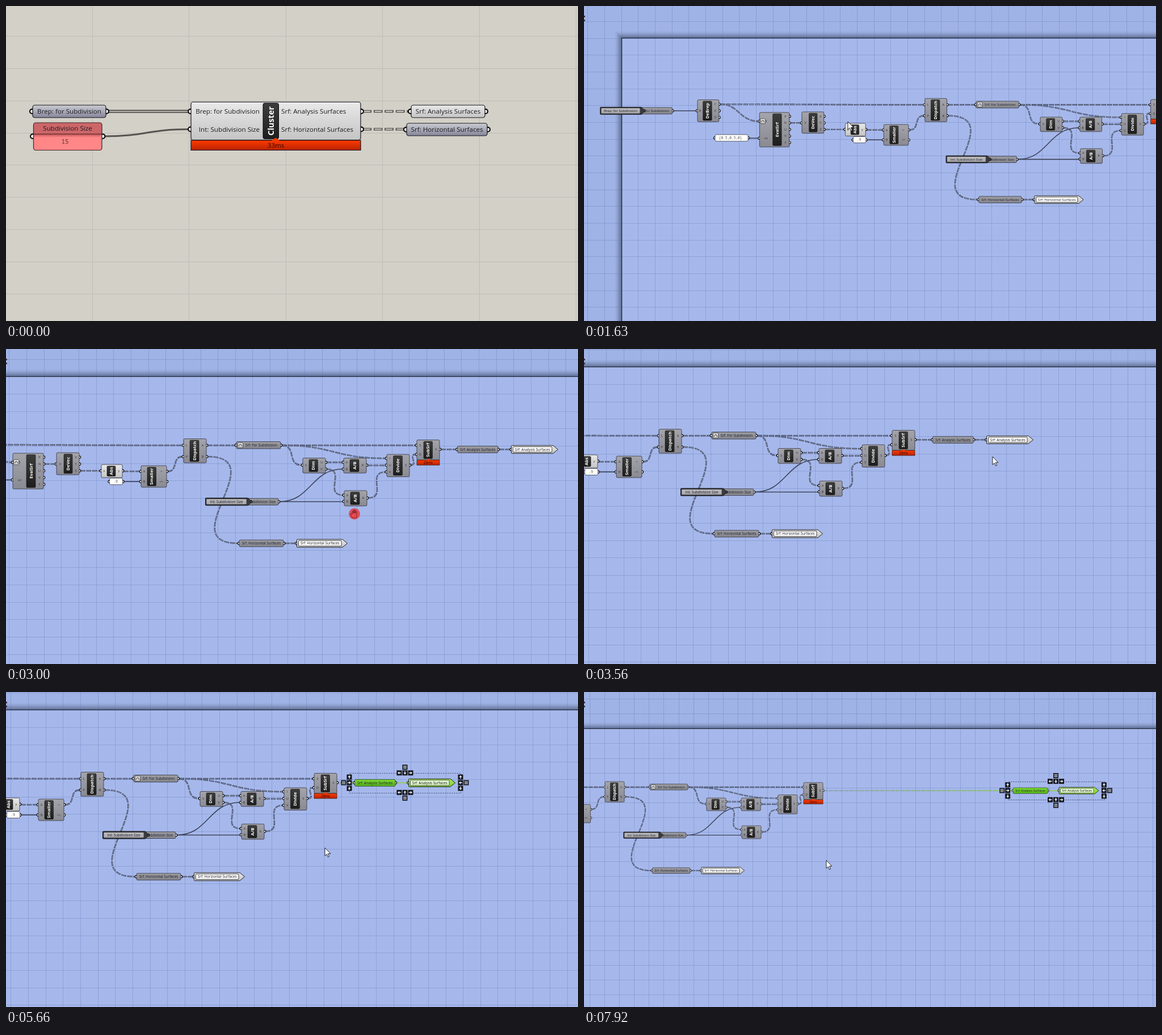
An HTML page with a canvas that plays this animation: 1008 by 556 pixels, repeating every 8000 ms.

```html
<!DOCTYPE html>
<html lang="en">
<head>
<meta charset="utf-8">
<title>Cluster editing</title>
<style>
html, body { margin: 0; width: 100%; height: 100%; overflow: hidden; background: #d3d0c8; }
canvas { display: block; width: 1008px; height: 556px; }
</style>
</head>
<body>
<canvas id="stage" width="1008" height="556"></canvas>
<script>
const W = 1008, H = 556, LOOP = 8000;
const g = document.getElementById('stage').getContext('2d');
const SANS = '"Open Sans", "Noto Sans", sans-serif';
const MONO = '"Noto Sans Mono", "DejaVu Sans Mono", monospace';
let u = 1; // drawing unit: size of strokes, type and grips

const TONE = {
  grey: ['#a4a4ab', '#8a8a93'],
  param: ['#9c9ca3', '#85858e'],
  steel: ['#cbcbd2', '#85859a'],
  light: ['#e9e9e9', '#c4c4c4'],
  white: ['#ffffff', '#ffffff'],
  dark: ['#3d3d3d', '#1d1d1d'],
  heat: ['#ff3a00', '#b82300'],
  green: ['#7bd834', '#55b41c'],
  lime: ['#a6ea5e', '#7fd02f']
};

// time, scale, offset x, offset y
const CAMERA = [
  [1430, .92, 563, -10], [1630, .968, 473, 26.2], [1700, .968, 473, 26.2],
  [1970, 1, 413, 50], [2500, 1, 413, 50], [2990, 1, 181, 17], [3065, 1, 181, 17],
  [3300, 1, 0, 0], [5790, 1, 0, 0], [6100, .8516, 85.6, 39],
  [7580, .8516, 85.6, 39], [7780, .8516, -75.4, 37.6]
];
// time, x, y
const POINTER = [
  [130, 954, 536], [880, 465, 204], [2170, 465, 204], [2500, 846, 324],
  [2990, 614, 291], [3065, 614, 291], [3300, 433, 274], [3560, 720, 190],
  [3640, 720, 190], [3780, 776, 195], [3850, 776, 195], [4620, 645, 116],
  [4690, 645, 116], [5380, 548, 262], [5460, 562, 275], [5790, 562, 275],
  [6100, 570, 276], [6490, 577, 263], [6630, 640, 177], [6700, 640, 177],
  [7080, 948, 177], [7240, 781, 264], [7380, 700, 303], [7580, 700, 303],
  [7780, 539, 299], [7920, 427, 297]
];
const DRAG = [[6700, 0], [7080, 362]];

function track(keys, t) {
  const n = keys.findIndex(k => k[0] > t);
  if (n === 0) return keys[0].slice(1);
  if (n < 0) return keys[keys.length - 1].slice(1);
  const a = keys[n - 1], b = keys[n];
  let p = (t - a[0]) / (b[0] - a[0]);
  p = p * p * (3 - 2 * p);
  return a.slice(1).map((v, i) => v + (b[i + 1] - v) * p);
}
const within = (t, a, b) => t >= a && t < b;

function shade(y0, y1, tone) {
  const f = g.createLinearGradient(0, y0, 0, y1);
  f.addColorStop(0, TONE[tone][0]);
  f.addColorStop(1, TONE[tone][1]);
  return f;
}

function box(x0, y0, x1, y1, tone, r = 2 * u, line = .65 * u, ink = '#17171c') {
  g.beginPath();
  g.roundRect(x0, y0, x1 - x0, y1 - y0, r);
  g.fillStyle = shade(y0, y1, tone);
  g.fill();
  if (line) {
    g.lineWidth = line;
    g.strokeStyle = ink;
    g.stroke();
  }
}

function text(s, x, y, align = 'center', size = 6.3 * u, color = '#1c1c22', font = SANS, weight = '') {
  g.font = `${weight} ${size}px ${font}`;
  g.textAlign = align;
  g.textBaseline = 'alphabetic';
  g.fillStyle = color;
  g.fillText(s, x, y + size * .35);
}

function grip(x, y) {
  g.beginPath();
  g.arc(x, y, 2.1 * u, 0, 7);
  g.fillStyle = '#fff';
  g.fill();
  g.lineWidth = 1.15 * u;
  g.strokeStyle = '#0c0c0e';
  g.stroke();
}

function plate(x0, y0, x1, y1, label) {
  box(x0, y0, x1, y1, 'dark', 1.6 * u, .5 * u, '#000');
  g.save();
  g.translate((x0 + x1) / 2, (y0 + y1) / 2);
  g.rotate(-Math.PI / 2);
  text(label, 0, 0, 'center', 7.8 * u, '#fff', SANS, 'bold');
  g.restore();
}

function timer(x0, y0, x1, y1, label) {
  box(x0, y0, x1, y1, 'heat', 0);
  const x = (x0 + x1) / 2;
  g.beginPath();
  g.moveTo(x - 3.8 * u, y0 + .4 * u);
  g.lineTo(x, y0 - 2.4 * u);
  g.lineTo(x + 3.8 * u, y0 + .4 * u);
  g.fillStyle = '#ff3a00';
  g.fill();
  text(label, x, (y0 + y1) / 2, 'center', 6.2 * u, '#2a0800');
}

// ports are written as name followed by height, such as "A183"
const ports = list => list.split(' ').map(p => p.match(/^(\D+)(\d+)$/)).map(m => [m[1], +m[2]]);

function node(x0, y0, x1, y1, label, px, pw, ins, outs, tone = 'grey') {
  const a = ports(ins), b = ports(outs);
  a.forEach(p => grip(x0 - .6, p[1]));
  b.forEach(p => grip(x1 + .6, p[1]));
  box(x0, y0, x1, y1, tone);
  a.forEach(p => text(p[0], (x0 + px) / 2, p[1], 'center', 5.6, '#30303a'));
  b.forEach(p => text(p[0], (x1 + px + pw) / 2, p[1], 'center', 5.6, '#30303a'));
  plate(px, y0 + 2.5, px + pw, y1 - 2.5, label);
}

function param(x0, y0, x1, y1, label, tone, shift = 0) {
  const y = (y0 + y1) / 2;
  grip(x0 - u * .6, y);
  grip(x1 + u * .6, y);
  box(x0, y0, x1, y1, tone);
  text(label, (x0 + x1) / 2 + shift, y);
}

function arrowBox(x0, y0, x1, y1, tip, fill, line) {
  g.beginPath();
  g.moveTo(x0 + 1, y0);
  g.lineTo(x1, y0);
  g.lineTo(tip, (y0 + y1) / 2);
  g.lineTo(x1, y1);
  g.lineTo(x0 + 1, y1);
  g.quadraticCurveTo(x0, y1, x0, y1 - 1);
  g.lineTo(x0, y0 + 1);
  g.quadraticCurveTo(x0, y0, x0 + 1, y0);
  g.fillStyle = fill;
  g.fill();
  g.lineWidth = line;
  g.strokeStyle = '#111';
  g.stroke();
}

function inlet(x, y, label) {
  grip(x + 80, y);
  arrowBox(x, y - 6.5, x + 75, y + 6.5, x + 81, '#3a3a40', 1);
  box(x + 2, y - 4.6, x + 72, y + 4.6, 'light', 1, 0);
  g.fillStyle = 'rgba(120,120,130,.4)';
  g.fillRect(x + 2, y - 4.6, 70, 9.2);
  text(label, x + 37, y);
}

function outlet(x0, x1, y, label, lit) {
  grip(x0 - .6, y);
  arrowBox(x0, y - 7, x1, y + 7, x1 + 8.5, shade(y - 7, y + 7, lit ? 'lime' : 'light'), .9);
  box(x0 + 3, y - 4.8, x1 - 2, y + 4.8, 'white', .8, .8);
  if (lit) {
    g.fillStyle = 'rgba(170,225,110,.35)';
    g.fillRect(x0 + 3, y - 4.8, x1 - x0 - 5, 9.6);
  }
  text(label, (x0 + x1) / 2 + .5, y);
}

function wire(x0, y0, x1, y1, kind, ink, core) {
  const c = Math.max(Math.abs(x1 - x0) / 2, Math.abs(y1 - y0) * .76);
  const draw = (width, color, dash, shift = 0, dy = 0) => {
    g.setLineDash(dash);
    g.lineDashOffset = shift;
    g.lineWidth = width;
    g.strokeStyle = color;
    g.beginPath();
    g.moveTo(x0, y0 + dy);
    g.bezierCurveTo(x0 + c, y0 + dy, x1 - c, y1 + dy, x1, y1 + dy);
    g.stroke();
  };
  if (kind === 'tree') {
    draw(2.5 * u, ink, [8.6 * u, 2 * u]);
    draw(1.05 * u, core, [6.6 * u, 4 * u], -u);
  } else if (kind === 'list') {
    draw(1.1 * u, ink, [], 0, -u);
    draw(1.1 * u, ink, [], 0, u);
  } else draw(1.65 * u, ink, []);
  g.setLineDash([]);
}

function blend(x0, x1, a, b) {
  const f = g.createLinearGradient(x0, 0, x1, 0);
  f.addColorStop(0, a);
  f.addColorStop(1, b);
  return f;
}

function grid(x, y, dx, dy, color) {
  g.fillStyle = color;
  for (let p = ((x % dx) + dx) % dx; p < W; p += dx) g.fillRect(Math.round(p), 0, 1, H);
  for (let p = ((y % dy) + dy) % dy; p < H; p += dy) g.fillRect(0, Math.round(p), W, 1);
}

function outer(picked) {
  u = 1.85;
  g.fillStyle = '#d3d0c8';
  g.fillRect(0, 0, W, H);
  grid(152, 53, 170.4, 56.85, '#bfbdb5');

  const ink = '#55534f', core = '#cfccc4', hot = '#62b820', pale = '#b9dc8e';
  const into = picked ? blend(178, 324, ink, hot) : ink;
  const out = picked ? blend(628, 710, hot, ink) : ink;
  wire(178, 186, 324, 186, 'list', into);
  wire(172, 230, 324, 217.5, 'item', into);
  wire(628, 186, 712, 186, 'tree', out, picked ? pale : core);
  wire(628, 217.5, 705, 217.5, 'tree', out, picked ? pale : core);

  param(47, 175, 176, 197, 'Brep: for Subdivision', 'steel');
  grip(47, 230);
  grip(170.5, 230);
  g.beginPath();
  g.roundRect(48.5, 206, 120.5, 48.5, 4);
  g.fillStyle = '#ff8788';
  g.fill();
  g.save();
  g.clip();
  g.fillStyle = '#cc6668';
  g.fillRect(48, 206, 122, 20);
  const fall = g.createLinearGradient(0, 226, 0, 232);
  fall.addColorStop(0, 'rgba(120,30,30,.5)');
  fall.addColorStop(1, 'rgba(120,30,30,0)');
  g.fillStyle = fall;
  g.fillRect(48, 226, 122, 6);
  g.fillStyle = '#4a2224';
  g.fillRect(48, 225.5, 122, 1);
  g.restore();
  g.lineWidth = 1.2;
  g.strokeStyle = '#3b2527';
  g.stroke();
  text('Subdivision Size', 108.5, 216);
  text('15', 104, 239, 'center', 11, '#5a3638', MONO);

  [186, 217.5].forEach(y => { grip(325, y); grip(626, y); });
  timer(326, 237, 625, 254.5, '33ms');
  box(326, 169.5, 625, 236.5, picked ? 'lime' : 'light');
  text('Brep: for Subdivision', 447, 186, 'right');
  text('Int: Subdivision Size', 447, 217.5, 'right');
  text('Srf: Analysis Surfaces', 485, 186, 'left');
  text('Srf: Horizontal Surfaces', 485, 217.5, 'left');
  plate(453, 171.5, 480.5, 234.5, 'Cluster');
  g.beginPath();
  g.moveTo(468, 237);
  g.lineTo(475, 232.5);
  g.lineTo(482, 237);
  g.fillStyle = '#ff3a00';
  g.fill();

  param(714, 175, 844, 197, 'Srf: Analysis Surfaces', 'light');
  param(706, 207, 848, 229, 'Srf: Horizontal Surfaces', 'steel');
}

const hatch = (() => {
  const c = document.createElement('canvas');
  c.width = c.height = 4;
  const k = c.getContext('2d');
  k.fillStyle = '#a2b5e8';
  k.fillRect(0, 0, 4, 4);
  k.fillStyle = '#99ace0';
  for (let i = 0; i < 4; i++) k.fillRect(i, i, 1, 1);
  return g.createPattern(c, 'repeat');
})();

function backdrop(s, ox, oy) {
  g.fillStyle = hatch;
  g.fillRect(0, 0, W, H);
  const x = Math.round(ox - 420.5 * s), y = Math.round(oy + 31 * s);
  for (let i = 13; i > 0; i--) {
    g.fillStyle = `rgba(30,38,62,${.085 * (1 - i / 14)})`;
    g.fillRect(x - i * s, y - i * s, 3000, 3000);
  }
  g.fillStyle = '#a6b8eb';
  g.fillRect(x, y, 3000, 3000);
  grid(ox + 8.3 * s, oy + 62 * s, 30.65 * s, 30.65 * s, 'rgba(85,108,175,.29)');
  g.fillStyle = '#1d2436';
  g.fillRect(x, y, 3000, 1.2);
  g.fillRect(x, y, 1.2, 3000);
}

function badge(x, y) {
  box(x, y, x + 9, y + 9, 'light', 1, .6);
  g.beginPath();
  g.moveTo(x + 2, y + 6.5);
  g.lineTo(x + 3.2, y + 3);
  g.lineTo(x + 5.8, y + 3);
  g.lineTo(x + 7, y + 6.5);
  g.lineWidth = .8;
  g.strokeStyle = '#222';
  g.stroke();
}

function inner(picked, dx) {
  u = 1;
  const ink = '#3c435a', core = '#8c97b6';
  const tree = (...p) => wire(...p, 'tree', ink, core);
  const item = (...p) => wire(...p, 'item', ink);

  item(-326, 164, -284, 164);
  tree(-241, 152, 130, 153);
  tree(-241, 152, -171, 183);
  item(-188, 214, -171, 214);
  tree(-113, 186, -94, 186);
  tree(-50, 198, -15, 198);
  tree(26, 199, 55, 199);
  item(27, 217, 55, 217);
  tree(104, 199, 130, 173);
  tree(174, 153, 223, 153);
  tree(174, 173, 228, 326);
  tree(305, 153, 541, 153);
  tree(305, 153, 340, 188);
  tree(305, 153, 488, 176);
  tree(384, 183, 412, 183);
  tree(384, 195, 413, 241);
  item(301, 252.5, 412, 195);
  item(301, 252.5, 413, 252.5);
  tree(456, 188.5, 488, 188.5);
  tree(457, 246, 488, 200);
  tree(532, 188, 541, 169);
  tree(310, 326, 329, 326);
  if (picked) {
    g.globalAlpha = .8;
    wire(585, 160.3, 612 + dx, 160.3, 'tree', blend(585, 613 + dx, '#7d8cae', '#78c42a'), '#a8c9a4');
    wire(688 + dx, 160.3, 707 + dx, 160.3, 'tree', '#7cc43c', '#b5e08c');
    g.globalAlpha = 1;
  } else {
    tree(585, 160.3, 612, 160.3);
    tree(688, 160.3, 707, 160.3);
  }

  param(-400, 158, -328, 170, 'Brep: for Subdivision', 'param');
  inlet(-459, 164, 'Brep: for Subdivision');
  node(-282, 144, -243, 184, 'DeBrep', -272, 16, 'B164', 'F152 E164 V176');
  grip(-250.5, 213.5);
  grip(-189.5, 213.5);
  box(-250, 207.5, -190, 219.5, 'white', 2);
  text('{0.5,0.5,0}', -222, 213.5, 'center', 6.4, '#555', MONO);
  node(-169, 167, -115, 230, 'EvalSrf', -145, 16, 'S183 uv214', 'P174 N186 U198 V210 F222');
  badge(-167.5, 178.5);
  node(-92, 166, -52, 205, 'DeVec', -79, 15, 'V186', 'X174 Y186 Z198');
  node(-13, 187, 24, 210, 'Abs', -3, 15, 'x198', 'y198', 'light');
  grip(1, 217);
  grip(25, 217);
  box(1.5, 211, 24.5, 222.5, 'white', 2);
  text('.9', 12, 216.5, 'center', 6.4, '#555', MONO);
  node(57, 189, 102, 227, 'Smaller', 68, 15.5, 'A199 B217', '<199 <=217');
  node(132, 141.5, 172, 184, 'Dispatch', 143, 16, 'L153 P173', 'A153 B173');
  param(225, 146.5, 303, 159, 'Srf: For Subdivision', 'param', 5);
  badge(227.5, 148.3);
  node(342, 175.5, 382, 202, 'Dim', 353, 15.5, 'S188', 'U183 V195');
  node(414, 175.5, 454, 202, 'A/B', 425, 16, 'A183 B195', 'R188');
  node(415, 233, 455, 260, 'A/B', 426, 16, 'A241 B252', 'R246');
  node(490, 169, 530, 208.5, 'Divide', 501.5, 16, 'I176 U188 V200', 'S188');
  node(543, 143.5, 583, 179, 'SubSrf', 555, 15.5, 'S153 D169', 'S160');
  timer(543, 179, 583, 188, '28ms');
  param(231, 246.8, 299, 258.5, 'Int: Subdivision Size', 'param');
  inlet(170.5, 252.5, 'Int: Subdivision Size');
  param(230, 320, 308, 332, 'Srf: Horizontal Surfaces', 'param');
  outlet(331.5, 412, 326, 'Srf: Horizontal Surfaces');
  param(614.5 + dx, 154.3, 686 + dx, 166.3, 'Srf: Analysis Surfaces', picked ? 'green' : 'param');
  outlet(709.5 + dx, 783 + dx, 160.3, 'Srf: Analysis Surfaces', picked);
}

// turn counts quarter turns of the arrow; null gives the bars glyph
function button(x, y, turn) {
  g.save();
  g.translate(x, y);
  g.fillStyle = '#14171e';
  g.fillRect(-4.5, -4.5, 9, 9);
  g.fillStyle = '#e8ecf6';
  if (turn === null) {
    for (let i = -2; i <= 2; i += 2) g.fillRect(-3, i - .5, 6, 1);
  } else {
    g.rotate(turn * Math.PI / 2);
    g.beginPath();
    g.moveTo(0, -3);
    g.lineTo(2.6, .2);
    g.lineTo(-2.6, .2);
    g.fill();
    g.fillRect(-.7, 0, 1.4, 3);
  }
  g.restore();
}

function aligner(s, ox, oy, dx) {
  const x0 = ox + s * (614.5 + dx) - 9.5, x1 = ox + s * (791.5 + dx) + 9.5;
  const y0 = oy + s * 153.3 - 10.5, y1 = oy + s * 167.3 + 10;
  const x = (x0 + x1) / 2, y = (y0 + y1) / 2;
  g.setLineDash([2, 2]);
  g.lineWidth = 1;
  g.strokeStyle = '#3a4770';
  g.strokeRect(Math.round(x0) + .5, Math.round(y0) + .5, Math.round(x1 - x0), Math.round(y1 - y0));
  g.setLineDash([]);
  [[x0, -1], [x1, 1]].forEach(([px, d]) => {
    button(px, y - 10, 0);
    button(px, y, d < 0 ? 1 : 3);
    button(px, y + 10, 2);
    button(px + d * 10, y, null);
  });
  [[y0, -1], [y1, 1]].forEach(([py, d]) => {
    button(x - 10, py, 3);
    button(x, py, d < 0 ? 2 : 0);
    button(x + 10, py, 1);
    button(x, py + d * 10, null);
  });
}

const ARROW = new Path2D('M0 0V14.2L3.3 11.2L5.5 16.3L7.6 15.4L5.4 10.4H9.9Z');
function arrow(x, y) {
  g.save();
  g.translate(x, y);
  g.fillStyle = '#fff';
  g.fill(ARROW);
  g.lineWidth = .9;
  g.strokeStyle = '#111';
  g.stroke(ARROW);
  g.restore();
}

const HAND = new Path2D('M-4 7L-7 1Q-7-1-5 0L-4 1V-4Q-3-6-2-4V-1V-6Q-1-8 0-6V-1V-6Q1-8 2-6V-1V-4Q3-6 4-4V3Q4 6 3 7Z');
function hand(x, y) {
  g.save();
  g.translate(x, y);
  g.beginPath();
  g.arc(0, 0, 10, 0, 7);
  g.fillStyle = '#d9515c';
  g.fill();
  g.fillStyle = '#ea4a4c';
  g.fill(HAND);
  g.lineWidth = .9;
  g.strokeStyle = '#7c1f2b';
  g.stroke(HAND);
  g.restore();
}

function marquee(x0, y0, x1, y1) {
  g.fillStyle = 'rgba(130,200,120,.25)';
  g.fillRect(x0, y0, x1 - x0, y1 - y0);
  g.setLineDash([4, 2]);
  g.lineWidth = 1;
  g.strokeStyle = '#3f7a3a';
  g.strokeRect(x0, y0, x1 - x0, y1 - y0);
  g.setLineDash([]);
}

function render(t) {
  const [px, py] = track(POINTER, t);
  if (t < 1430) {
    outer(t >= 950);
  } else {
    const [s, ox, oy] = track(CAMERA, t), [dx] = track(DRAG, t);
    const picked = t >= 4690;
    backdrop(s, ox, oy);
    g.setTransform(s, 0, 0, s, ox, oy);
    inner(picked, dx);
    g.setTransform(1, 0, 0, 1, 0, 0);
    if (picked) aligner(s, ox, oy, dx);
    if (within(t, 3850, 4690)) marquee(776, 195, px, py);
    g.fillStyle = '#463a3c';
    g.fillRect(0, 17, 2, 3);
    g.fillRect(0, 24, 2, 3);
  }
  if (within(t, 2500, 3300) || within(t, 7580, 7780)) hand(px, py);
  else if (t >= 130) arrow(px, py);
}

function tick() {
  render(performance.now() % LOOP);
  requestAnimationFrame(tick);
}
tick();
</script>
</body>
</html>
```
